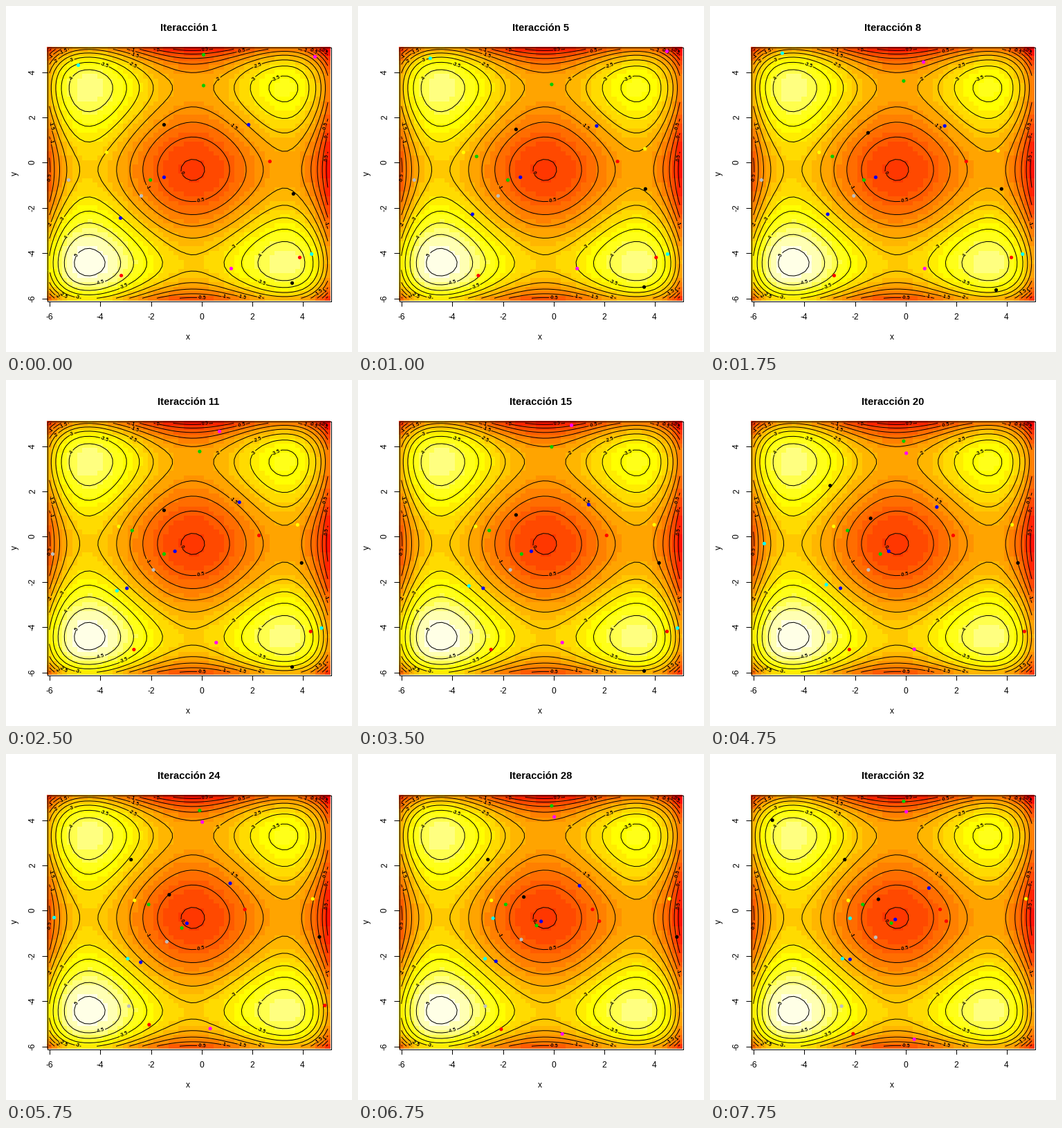
Write a matplotlib script that moves like this. It is 500 px wide and 500 px high and loops after 8 s.

```python
import numpy as np
import matplotlib.pyplot as plt
from matplotlib.animation import FuncAnimation
from matplotlib.colors import ListedColormap, hsv_to_rgb

SIZE, DPI = 500, 100
FRAMES, INTERVAL = 32, 250
LEFT, RIGHT, TOP, BOTTOM = 59.04, 468.76, 59.04, 425.56
LOW, HIGH, CELL = -6, 5, 0.2
HALF = CELL / 2
PT = 72 / DPI

plt.rcParams["font.family"] = "Liberation Sans"


def to_x(v):
    return LEFT + (v - LOW + HALF) * (RIGHT - LEFT) / (HIGH - LOW + CELL)


def to_y(v):
    return BOTTOM - (v - LOW + HALF) * (BOTTOM - TOP) / (HIGH - LOW + CELL)


def term(v):
    return 0.01 * ((v + 0.5) ** 4 - 30 * v ** 2 - 20 * v)


def height(x, y):
    return term(x) + term(y)


def heat_colors(n):
    pale = n // 4
    hues = [(h, 1, 1) for h in np.linspace(0, 1 / 6, n - pale)]
    tints = [(1 / 6, s, 1)
             for s in np.linspace(1 - 0.5 / pale, 0.5 / pale, pale)]
    return ListedColormap(hsv_to_rgb(hues + tints))


fig = plt.figure(figsize=(SIZE / DPI, SIZE / DPI), dpi=DPI, facecolor="white")
ax = fig.add_axes([0, 0, 1, 1])
ax.axis("off")

# Heat map
cells = round((HIGH - LOW) / CELL) + 1
grid = np.linspace(LOW, HIGH, cells)
edges = np.linspace(LOW - HALF, HIGH + HALF, cells + 1)
z = height(grid[None, :], grid[:, None])
ax.pcolormesh(np.round(to_x(edges)), np.round(to_y(edges)), -z,
              cmap=heat_colors(20), antialiased=False, zorder=1)


def stroke(xs, ys, zorder=2):
    ax.plot(xs, ys, color="black", lw=PT, solid_capstyle="butt", zorder=zorder)


def write(x, y, text, px=12, **style):
    style = {"ha": "center", "va": "baseline", "zorder": 3, **style}
    return ax.text(x, y, text, fontsize=px * PT, **style)


def from_leftmost(line):
    """Let a closed contour begin at its leftmost point."""
    if not np.allclose(line[0], line[-1]):
        return line
    ring = np.roll(line[:-1], -np.argmin(line[:-1, 0]), axis=0)
    return np.vstack([ring, ring[:1]])


def flattest(line, width):
    """Span of the line, as wide as the label, whose slope varies least."""
    best, span = np.inf, None
    for i in range(len(line)):
        reach = np.hypot(*(line[i:] - line[i]).T) >= width
        if not reach.any():
            continue
        j = i + np.argmax(reach)
        dx, dy = np.diff(line[i:j + 1], axis=0).T
        slope = dy / np.where(np.abs(dx) < 1e-9, 1, dx)
        spread = ((slope - slope.mean()) ** 2).sum()
        if spread < best:
            best, span = spread, (i, j)
    return span


def draw_contour(line, level):
    line = from_leftmost(line)
    label = write(0, 0, f"{level:g}", px=7.2, weight="bold", va="center")
    width = label.get_window_extent().width + 1
    span = flattest(line, width)
    if span is None:
        label.remove()
        stroke(*line.T)
        return
    i, j = span
    chord = line[j] - line[i]
    gap = chord * width / np.hypot(*chord)
    angle = np.degrees(np.arctan2(-gap[1], gap[0]))
    label.set_position(line[i] + gap / 2)
    label.set_rotation((angle + 90) % 180 - 90)
    stroke(*line[:i + 1].T)
    stroke(*np.vstack([line[i] + gap, line[j:]]).T)


levels = np.arange(-5, 1.1, 0.5)
contours = ax.contour(to_x(grid), to_y(grid), z, levels=levels)
all_lines = contours.allsegs
contours.remove()
ax.set_xlim(0, SIZE)
ax.set_ylim(SIZE, 0)
for level, lines in zip(levels, all_lines):
    for line in lines:
        if len(line) > 1:
            draw_contour(np.array(line), level)

# Frame, ticks and axis names
stroke([59.5, 469.5, 469.5, 59.5, 59.5], [59.5, 59.5, 426.5, 426.5, 59.5], 4)
for tick in range(-6, 5, 2):
    x, y = np.floor([to_x(tick), to_y(tick)]) + 0.5
    stroke([x, x], [426.5, 434], 4)
    stroke([52, 59.5], [y, y], 4)
    write(x, 453, str(tick))
    write(45, y, str(tick), rotation=90, ha="right", va="center")
write(263, 482, "x")
write(19, 242, "y", rotation=90, ha="right", va="center")
title = write(264, 36, "", px=14.7, weight="bold")

PALETTE = ["#000000", "#ff0000", "#00cd00", "#0000ff",
           "#00ffff", "#ff00ff", "#ffff00", "#bebebe"]

# Each climber: (x, y, step) of its start, then of each restart after leaving
CLIMBERS = [
    [(-1.47, 1.66, 0.051)],
    [(2.71, 0.04, 0.043)],
    [(0.09, 3.39, 0.051)],
    [(1.87, 1.66, 0.052)],
    [(-4.86, 4.29, 0.076), (-3.33, -2.40, 0.053)],
    [(4.49, 4.66, 0.061), (0.72, 4.36, 0.068), (0.04, 3.50, 0.057)],
    [(-3.74, 0.44, 0.048)],
    [(-5.24, -0.78, 0.063), (-3.29, -4.23, 0.043)],
    [(3.64, -1.39, 0.054), (-5.20, 3.98, 0.05)],
    [(3.89, -4.20, 0.043), (1.87, -0.48, 0.05)],
    [(0.09, 4.75, 0.085), (-3.08, 0.26, 0.05)],
    [(-1.47, -0.66, 0.043)],
    [(4.36, -4.05, 0.039), (-5.45, -0.32, 0.06), (-2.38, -0.35, 0.05)],
    [(1.18, -4.69, 0.059)],
    [(-5.98, -4.78, 0.05), (3.62, 0.74, 0.046)],
    [(-2.37, -1.48, 0.048)],
    [(3.59, -5.33, 0.044), (-3.11, 2.24, 0.048)],
    [(-3.16, -5.00, 0.05)],
    [(-2.01, -0.78, 0.054)],
    [(-3.19, -2.46, 0.042)],
]


def climb(lives):
    """Step along the axis that gains most height; restart outside the map."""
    lives = iter(lives)
    x, y, step = next(lives)
    path = [(x, y)]
    while len(path) < FRAMES:
        moves = [(x + step, y), (x - step, y), (x, y + step), (x, y - step)]
        x, y = max(moves, key=lambda p: height(*p))
        if not (LOW <= x <= HIGH and LOW <= y <= HIGH):
            x, y, step = next(lives, (x, y, step))
        path.append((x, y))
    return path


paths = np.array([climb(lives) for lives in CLIMBERS])
spots = np.dstack([to_x(paths[..., 0]), to_y(paths[..., 1])])
colors = [PALETTE[i % len(PALETTE)] for i in range(len(CLIMBERS))]
dots = ax.scatter(spots[:, 0, 0], spots[:, 0, 1], s=(5.2 * PT) ** 2,
                  c=colors, linewidths=0, zorder=5)


def draw(frame):
    title.set_text(f"Iteracción {frame + 1}")
    dots.set_offsets(spots[:, frame])
    return title, dots


anim = FuncAnimation(fig, draw, frames=FRAMES, interval=INTERVAL, repeat=True,
                     repeat_delay=0, init_func=lambda: draw(0))
plt.show()
```
